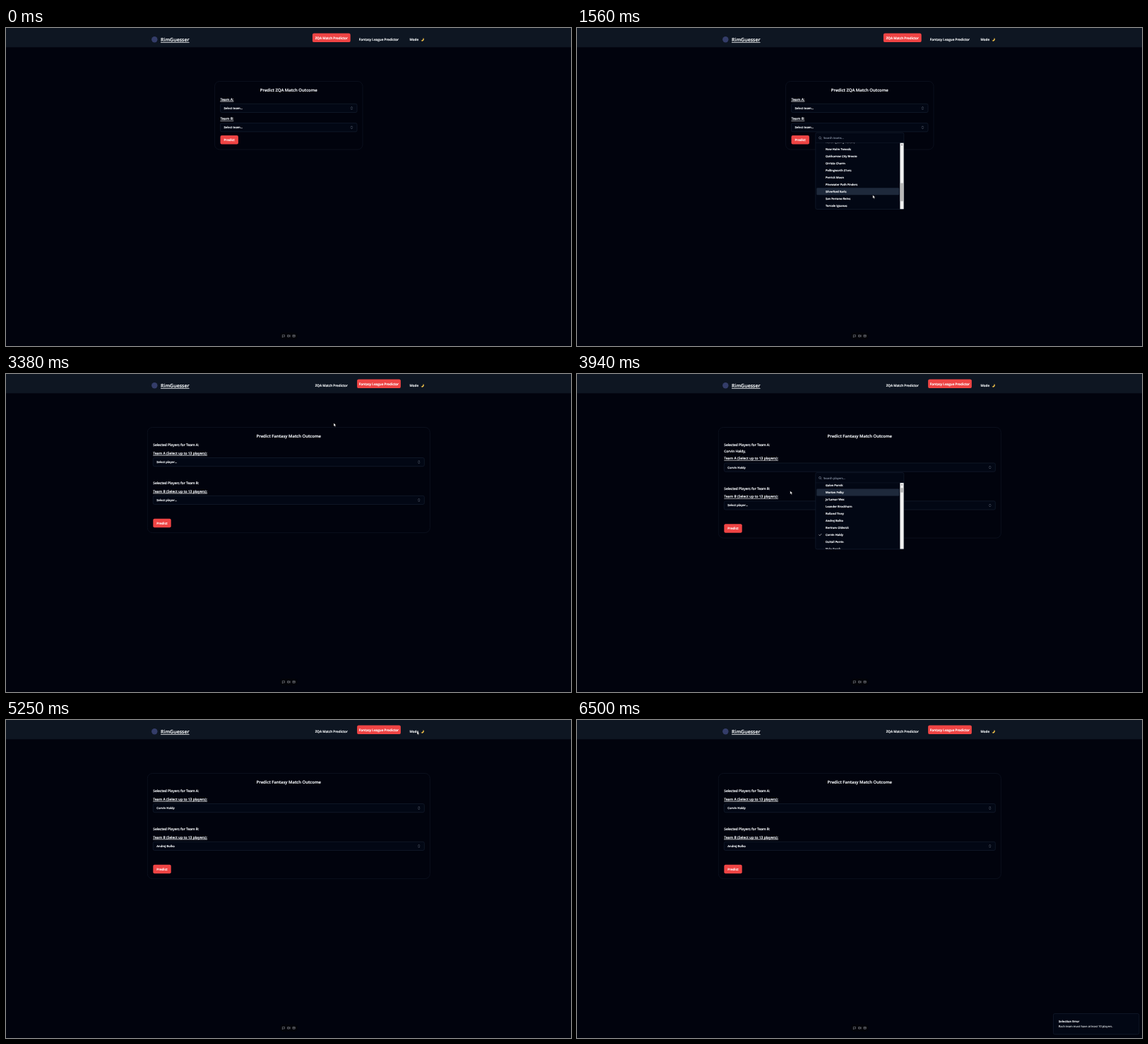
Recreate the animation shown at these times as an HTML page. Size 800x450 px, loop 6940 ms.

```html
<!DOCTYPE html>
<html lang="en">
<head>
<meta charset="utf-8">
<title>Match predictor demo</title>
<style>
html, body { margin: 0; width: 100%; height: 100%; overflow: hidden; background: #01030d; }
#stage { display: block; width: 100vw; height: 100vh; }
text { font-family: "Open Sans", "Noto Sans", sans-serif; text-rendering: geometricPrecision; white-space: pre; }
</style>
</head>
<body>
<svg id="stage" viewBox="0 0 800 450"></svg>
<script>
const LOOP = 6940, TICK = 62.5, LAST = 104;
const ROW = 10, VIEW = 93.5, TOAST_TICKS = 14;

const teams = ["Arbury Otters", "Belford Quails", "Bramwick Oars", "Carrowden Beetles", "Corvane Moles",
  "Cresthill Wayfarers", "Dunmor Tinkerers", "Dellow Pebbles", "Dravick Gaskets", "Garnet Shore Fencers",
  "Hartwyn Gliders", "Inverley Walkers", "Kestrow Sailors", "Lorring Ponds", "Marlby Badgers",
  "Melby Frost", "Millhaven Goats", "Minderly Foxes", "North Quarry Herons", "New Holm Tweeds",
  "Oakharrow City Breeze", "Orrista Charm", "Pellingworth 31ers", "Perrick Moon", "Pinewater Path Finders",
  "Silverford Earls", "San Ferrano Reins", "Torvale Iguanas", "Ullswick Harps", "Wexmoor Comets"];
const players = ["Ludo Brenvik", "Marek Ostling", "Anders Quillby", "Galen Porvik", "Morten Felby",
  "Jo'Lamar Wex", "Leander Brockhurn", "Rolland Tivey", "Andrej Bolko", "Bertram Oldwick",
  "Corvin Haldy", "DuVall Perrin", "Nyle Gorsk", "Ellis Thorvy", "Bo Kelvane", "Gregory Lanse",
  "Tamsin Orrel", "Hugo Vantry", "Piers Malloden", "Oskar Jellby"];

const dark = { bg: "#01030d", head: "#0e1622", text: "#f8fafc", card: "#01030d", edge: "#111827", logo: "#343d69",
  box: "#020714", line: "#182234", row: "#1e293b", soft: "#a3aec0", btn: "#ef4444", hover: "#1e293b", pill: "#030409" };
const light = { bg: "#edf1f5", head: "#ffffff", text: "#1e293b", card: "#edf1f5", edge: "#dce2e9", logo: "#1c2547",
  box: "#ffffff", line: "#f8fafc", row: "#e2e8f0", soft: "#64748b", btn: "#2450cc", hover: "#b3b7be", pill: "#222428" };

const spot = { teamA: [410, 114], teamB: [410, 141], predict: [316, 158], fantasy: [528, 14],
  playersA: [400, 125], playersB: [400, 186], predictAll: [222, 211], mode: [582, 16] };

// The session: at a tick the pointer reaches `go` and the interface takes `set`
const script = [
  { at: 0, set: { page: "match", open: "", a: -1, b: -1, listA: "", listB: "" } },
  { at: 1, go: [640, 330] },
  { at: 5, go: spot.teamA, set: { open: "A", scroll: 80 } },
  { at: 11, go: [415, 210] },
  { at: 13, set: { open: "" } },
  { at: 15, go: spot.teamB, set: { open: "B", scroll: 188.5 } },
  { at: 25, go: [418.8, 236.5] },
  { at: 26, set: { open: "" } },
  { at: 28, go: spot.predict, set: { toast: "Please select both teams." } },
  { at: 31, go: spot.teamA, set: { open: "A", scroll: 110 } },
  { at: 35, go: [395, 190], set: { open: "", a: 16 } },
  { at: 38, go: spot.teamB, set: { open: "B", scroll: 19.5 } },
  { at: 42, go: [407.8, 219.5] },
  { at: 44, go: [380, 200], set: { open: "", b: 5 } },
  { at: 47, go: spot.predict },
  { at: 52, go: spot.fantasy, set: { page: "fantasy", a: -1, b: -1 } },
  { at: 56, go: spot.playersA, set: { open: "A", scroll: 33.5 } },
  { at: 61, go: [375, 219], set: { a: 10, listA: players[10] + "," } },
  { at: 62, go: [345, 168] },
  { at: 63, go: [301.8, 165.5] },
  { at: 64, set: { open: "" } },
  { at: 66, go: spot.playersB, set: { open: "B", scroll: 65 } },
  { at: 70, go: [403.8, 283.5] },
  { at: 72, go: [403.8, 283.5], set: { b: 13, listB: players[13] + "," } },
  { at: 75, go: [380, 238], set: { b: 8, listB: players[13] + ", " + players[8] + "," } },
  { at: 77, set: { open: "" } },
  { at: 79, go: spot.predictAll, set: { listA: "", listB: "" } },
  { at: 84, go: spot.mode },
  { at: 85, set: { mode: true } },
  { at: 86, go: spot.mode, set: { light: true } },
  { at: 89, go: [464.8, 108.5] },
  { at: 94, go: spot.mode, set: { light: false } },
  { at: 96, set: { mode: false } },
  { at: 99, go: spot.predictAll, set: { toast: "Each team must have at least 10 players." } },
  { at: 103, go: spot.predictAll }
];
const stops = script.filter(e => e.go);

function stateAt(tick) {
  const s = {};
  for (const { at, set } of script) {
    if (at > tick) break;
    Object.assign(s, set);
    if (set && set.open) s.openAt = at;
    if (set && set.toast) s.toastAt = at;
  }
  return s;
}

function pointerAt(tick) {
  const i = stops.findIndex(e => e.at > tick);
  if (i <= 0) return stops[i < 0 ? stops.length - 1 : 0].go;
  const p = stops[i - 1], q = stops[i], k = (tick - p.at) / (q.at - p.at);
  return p.go.map((v, j) => v + (q.go[j] - v) * k);
}

const clamp = v => Math.min(1, Math.max(0, v));

const rect = (x, y, w, h, r, fill, stroke) =>
  `<rect x="${x}" y="${y}" width="${w}" height="${h}" rx="${r}" fill="${fill}"` +
  (stroke ? ` stroke="${stroke}" stroke-width=".6"` : "") + "/>";
const path = (d, stroke, w = .5, fill = "none") =>
  `<path d="${d}" fill="${fill}" stroke="${stroke}" stroke-width="${w}" stroke-linecap="round" stroke-linejoin="round"/>`;
const circle = (x, y, r, fill, extra = "") => `<circle cx="${x}" cy="${y}" r="${r}" fill="${fill}" ${extra}/>`;
// y is the optical middle of the line; a hairline stroke keeps tiny text crisp
function label(s, x, y, size, fill, { w = 600, mid = false, line = false } = {}) {
  return `<text x="${x}" y="${y + size * .35}" font-size="${size}" font-weight="${w}" fill="${fill}"` +
    ` stroke="${fill}" stroke-width="${w > 400 ? .16 : .08}"` +
    (mid ? ' text-anchor="middle"' : "") + (line ? ' text-decoration="underline"' : "") + `>${s}</text>`;
}

function header(s, c) {
  const item = (name, x, w, on) =>
    (on ? rect(x - w / 2, 7.6, w, 12.5, 2.2, c.btn) : "") +
    label(name, x, on ? 14.2 : 16.5, 4.64, on ? "#fff" : c.text, { mid: true });
  const icon = s.light
    ? circle(589.6, 16, 1.4, "#f0bf2c") + circle(589.6, 16, 2.3, "none", 'stroke="#f0bf2c" stroke-width=".7" stroke-dasharray=".7 1.1"')
    : path("M590.6 13.9A2.5 2.5 0 1 1 587.3 17.6A3 3 0 0 0 590.6 13.9Z", "none", 0, "#f3c34a");
  return rect(0, 0, 800, 27.3, 0, c.head) +
    circle(210.3, 16.2, 4.2, c.logo) +
    label("RimGuesser", 219, 16.6, 7, c.text, { line: true }) +
    item("ZQA Match Predictor", 460.8, 53.8, s.page === "match") +
    item("Fantasy League Predictor", 528, 61.8, s.page === "fantasy") +
    (s.mode ? rect(569, 9.4, 26.3, 12, 2, c.hover) : "") +
    label("Mode", 571.5, 16.3, 4.64, c.text) + icon;
}

function footer(c) {
  const ink = "#c4c8ce";
  return rect(388, 431, 24.5, 9.8, 4.6, c.pill) +
    path("M391.3 437.4V434.3H394.5V436.9H392.2Z", ink, .4) +
    path("M398.9 434.6H401V437H398.9ZM402.1 434.6V437", ink, .45) +
    path("M406.4 434.3H409.2V437.2H406.4ZM406.5 435.7H409.1", ink, .4);
}

const combo = (x, w, y, value, c) =>
  rect(x, y - 6.1, w, 12.2, 2, c.box, c.line) +
  label(value, x + 5, y, 4.15, c.text) +
  path(`M${x + w - 8.7} ${y - .8}l1.1-1.1 1.1 1.1M${x + w - 8.7} ${y + .8}l1.1 1.1 1.1-1.1`, c.soft, .45);

const button = (x, y, c) =>
  rect(x, y - 6.3, 25.4, 12.5, 2, c.btn) + label("Predict", x + 12.7, y, 4.5, "#fff", { mid: true });

function card(s, c) {
  const match = s.page === "match", names = match ? teams : players;
  const pick = i => i < 0 ? `Select ${match ? "team" : "player"}...` : names[i];
  const da = s.listA ? 7.5 : 0, d = da + (s.listB ? 7.5 : 0);
  const x = match ? 303.5 : 208.3, w = match ? 193.5 : 384;
  const yA = match ? 113.4 : 124.6 + da, yB = match ? 140.7 : 178.4 + d;
  const bottom = match ? 172 : 224.6 + d;
  const tag = (t, y) => label(t, x, y, 4.95, c.text, { line: true });
  let out = rect(x - 8, 75.5, w + 16, bottom - 75.5, 7, c.card, c.edge) +
    label(match ? "Predict ZQA Match Outcome" : "Predict Fantasy Match Outcome", 400.3, 88, 5.95, c.text, { mid: true });
  if (match) {
    out += tag("Team A:", 101) + tag("Team B:", 128.4);
  } else {
    const head = (t, list, y) => label(`Selected Players for Team ${t}:`, x, y, 4.8, c.text) +
      label(list, x, y + 9, 4.8, c.text);
    out += head("A", s.listA, 100.8) + head("B", s.listB, 154.6 + da) +
      tag("Team A (Select up to 13 players):", 112.2 + da) + tag("Team B (Select up to 13 players):", 166 + d);
  }
  out += combo(x, w, yA, pick(s.a), c) + combo(x, w, yB, pick(s.b), c) +
    button(x, match ? 158.2 : 211 + d, c);
  return { out, yA, yB, names };
}

function popover(s, c, top, names, tick) {
  const scroll = s.scroll * clamp((tick - s.openAt - 1) / 3);
  const listY = top + 14.5, first = listY + 7 - scroll;
  const isTeam = s.page === "match", chosen = s.open === "A" ? s.a : s.b;
  // the highlighted row trails the pointer by one tick
  const [px, py] = pointerAt(tick - 1);
  const inside = px > 338 && px < 457 && py > listY && py < listY + VIEW;
  const active = inside ? Math.floor((py - first) / ROW + .5) : -1;
  const rows = names.map((n, i) => {
    const y = first + i * ROW;
    return (i === active ? rect(339.3, y - 5, 117, ROW, 1.3, c.row) : "") +
      (i === chosen ? path(`M342.7 ${y}l1.1 1.2 2.2-2.5`, c.text, .55) : "") +
      label(n, 352, y, 4.05, c.text);
  }).join("");
  const total = isTeam ? 304 : 1250, track = VIEW - 10;
  const thumb = Math.max(6, track * VIEW / total);
  const thumbY = listY + 5 + scroll / (total - VIEW) * (track - thumb);
  const arrow = (y, k) => path(`M459 ${y + k}h2l-1-${k > 0 ? 1.4 : -1.4}z`.replace("--", ""), "none", 0, "#505050");
  return rect(337.8, top, 125, 108.3, 2, c.box, c.line) +
    circle(344, top + 7.2, 1.5, "none", `stroke="${c.soft}" stroke-width=".45"`) +
    path(`M345.1 ${top + 8.3}l1.1 1.1`, c.soft, .45) +
    label(`Search ${isTeam ? "teams" : "players"}...`, 349, top + 7.5, 4.08, c.soft, { w: 400 }) +
    path(`M338 ${listY - .2}H462.6`, c.line, .4) +
    `<svg x="338" y="${listY}" width="124.8" height="${VIEW}" viewBox="338 ${listY} 124.8 ${VIEW}" overflow="hidden">${rows}</svg>` +
    rect(457.4, listY, 5.2, VIEW, 0, "#f1f1f1") + rect(457.7, thumbY, 4.6, thumb, 0, "#b9b9b9") +
    arrow(listY + 2.5, .7) + arrow(listY + VIEW - 2.5, -.7);
}

// Rises from the bottom, leaves to the right
function toast(s, c, tick) {
  const age = tick - s.toastAt;
  if (!s.toast || age > TOAST_TICKS) return "";
  const x = age === TOAST_TICKS ? 111 : 0, y = age === 0 ? 16 : 0;
  return `<g transform="translate(${x} ${y})">` +
    rect(674.5, 415.5, 121.3, 29.3, 2, c.box, c.line) +
    label("Selection Error", 682, 426.5, 4.13, c.text) +
    label(s.toast, 682, 434, 4.06, c.text, { w: 400 }) + "</g>";
}

function cursor(tick) {
  if (tick < stops[0].at || tick >= stops[stops.length - 1].at) return "";
  const [x, y] = pointerAt(tick);
  return path(`M${x} ${y}v4.6l1.1-1 .8 1.7 .8-.4-.8-1.6h1.5z`, "#111", .35, "#fff");
}

function draw(tick) {
  const s = stateAt(tick), c = s.light ? light : dark;
  const form = card(s, c);
  return rect(0, 0, 800, 450, 0, c.bg) + header(s, c) + form.out + footer(c) +
    (s.open ? popover(s, c, form["y" + s.open] + 7.5, form.names, tick) : "") +
    toast(s, c, tick) + cursor(tick);
}

const stage = document.getElementById("stage");
const start = performance.now();
let shown = -1;
function frame() {
  const t = Math.max(0, performance.now() - start) % LOOP;
  const tick = Math.min(LAST, Math.floor((t + 2.5) / TICK));
  if (tick !== shown) stage.innerHTML = draw(shown = tick);
  requestAnimationFrame(frame);
}
frame();
</script>
</body>
</html>
```
